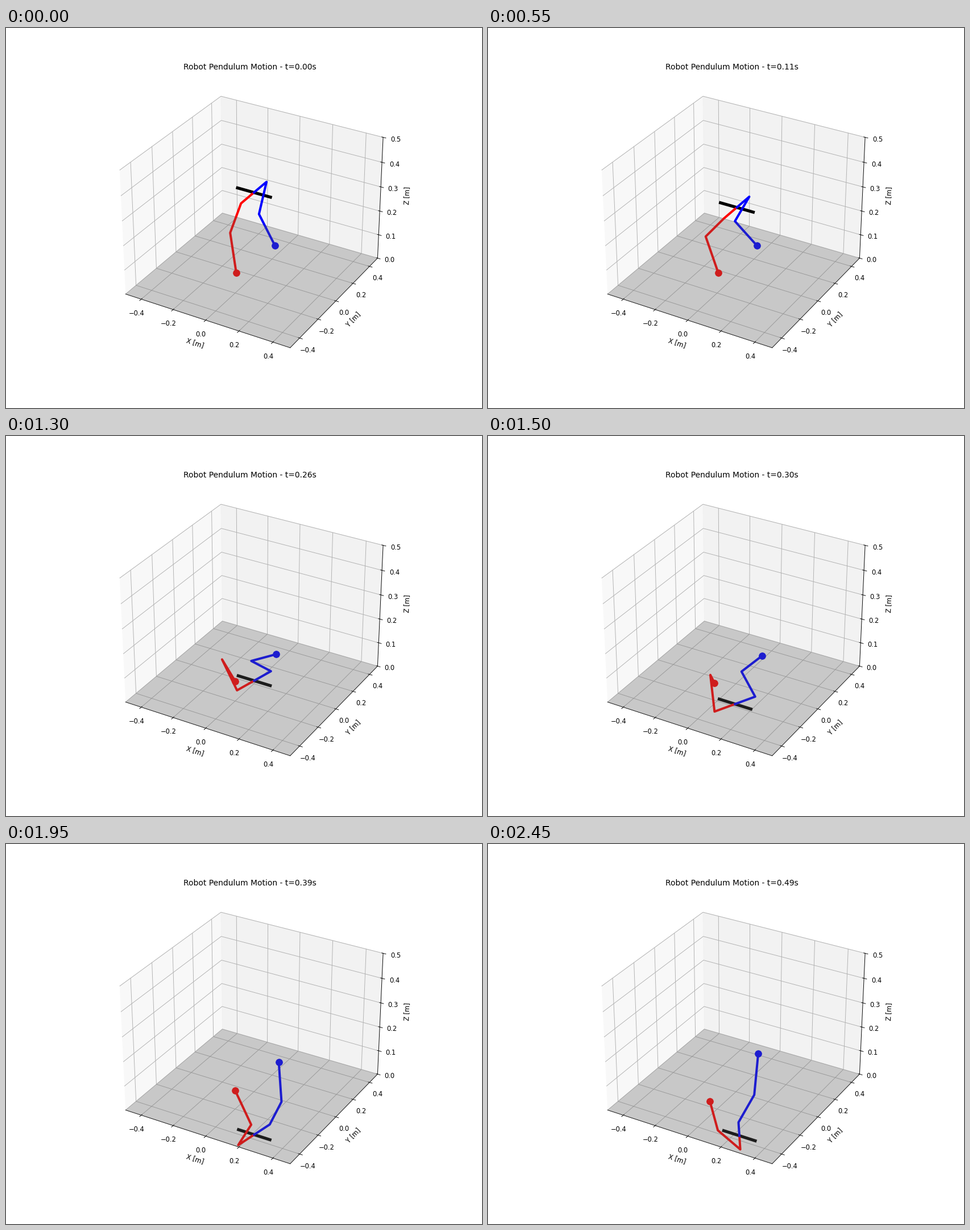
These frames come from a looping animation (837x669 px, 2.5 s). A matplotlib script:

```python
import numpy as np
import matplotlib.pyplot as plt
from matplotlib.animation import FuncAnimation

FRAMES, STEP_MS, DT = 50, 50, 0.01

GRAVITY = 9.81
BRAKE_TIME = 0.26   # the fall stops speeding up here
START_Z, MAX_DROP = 0.345, 0.531
BAR_HALF, HIP_HALF, THIGH = 0.1, 0.134, 0.148


def glide(t, *keys):
    """Smooth curve through (time, value, ...) keys that never overshoots."""
    keys = np.array(keys, float)
    k, v = keys[:, 0], keys[:, 1:]
    h = np.diff(k)[:, None]
    d = np.diff(v, axis=0) / h
    m = np.zeros_like(v)
    product = d[:-1] * d[1:]
    rising = product > 0
    m[1:-1][rising] = 2 * product[rising] / (d[:-1] + d[1:])[rising]

    t = np.clip(t, k[0], k[-1])
    i = min(np.searchsorted(k, t, side="right") - 1, len(h) - 1)
    s = (t - k[i]) / h[i]
    return ((1 + 2 * s) * (1 - s) ** 2 * v[i] + s * (1 - s) ** 2 * h[i] * m[i]
            + s * s * (3 - 2 * s) * v[i + 1]
            + s * s * (s - 1) * h[i] * m[i + 1])


def body_at(t):
    """Free fall, steady speed, then a hard stop with a soft dip."""
    u = min(t, BRAKE_TIME)
    drop = min(GRAVITY * u * (t - u / 2), MAX_DROP)
    drop += 0.016 * np.sin(np.pi * np.clip((t - 0.39) / 0.1, 0, 1))
    x = glide(t, (0, 0), (0.2, 0.009), (0.33, -0.008), (0.49, 0.022))[0]
    return np.array([x, 0, START_Z - drop])


def yaw_at(t):
    return np.radians(glide(t, (0.2, 0), (0.33, 30), (0.49, -32))[0])


def red_pose(t):
    """Thigh angle and foot position."""
    angle = glide(t, (0, -27), (0.2, -87), (0.3, -165), (0.39, -219),
                  (0.49, -125))
    slide = glide(t, (0.24, 0, 0), (0.3, -0.005, -0.03),
                  (0.39, 0.004, -0.018), (0.49, 0.026, -0.13))
    return angle[0], np.array([-0.031, -0.135, 0.055]) + [*slide, 0]


def blue_pose(t):
    angle = glide(t, (0, -18), (0.2, -66), (0.3, -115), (0.39, -214),
                  (0.49, -216))
    slide = glide(t, (0.24, 0, 0), (0.3, 0.035, -0.005),
                  (0.39, 0.021, 0.005), (0.49, -0.037, 0.08))
    return angle[0], np.array([0.054, 0.135, 0.091]) + [*slide, 0]


def leg_path(body, yaw, side, angle, foot):
    """Body, hip, knee and foot; the thigh swings in the turned body's plane."""
    a = np.radians(angle)
    hip = body + side * HIP_HALF * np.array([np.sin(yaw), np.cos(yaw), 0])
    knee = hip + THIGH * np.array(
        [np.sin(a) * np.cos(yaw), -np.sin(a) * np.sin(yaw), -np.cos(a)])
    return np.array([body, hip, knee, foot])


fig = plt.figure(figsize=(10.0845, 8.0605), dpi=83)
ax = fig.add_subplot(111, projection="3d")

# Translucent ground, tinting whatever lies behind it
gx, gy = np.meshgrid([-0.5, 0.5], [-0.5, 0.5])
ax.plot_surface(gx, gy, np.zeros_like(gx), color="gray", alpha=0.3)

bar, = ax.plot([], [], [], color="black", lw=4.6)
legs = []
for color, side, pose in (("red", -1, red_pose), ("blue", 1, blue_pose)):
    line, = ax.plot([], [], [], color=color, lw=3.5)
    foot, = ax.plot([], [], [], color=color, marker="o", ms=10, ls="none")
    legs.append((line, foot, side, pose))

ax.set(xlim=(-0.5, 0.5), ylim=(-0.5, 0.5), zlim=(0, 0.5),
       xlabel="X [m]", ylabel="Y [m]", zlabel="Z [m]")
ax.set_xticks(np.linspace(-0.4, 0.4, 5))
ax.set_yticks(np.linspace(-0.4, 0.4, 5))
ax.set_zticks(np.linspace(0, 0.5, 6))


def update(i):
    t = i * DT
    body, yaw = body_at(t), yaw_at(t)
    x, y, z = body
    bar.set_data_3d([x - BAR_HALF, x + BAR_HALF], [y, y], [z, z])
    for line, foot, side, pose in legs:
        path = leg_path(body, yaw, side, *pose(t))
        line.set_data_3d(*path.T)
        foot.set_data_3d(*path[-1:].T)
    ax.set_title(f"Robot Pendulum Motion - t={t:.2f}s")
    return []


anim = FuncAnimation(fig, update, frames=FRAMES, interval=STEP_MS,
                     repeat=True, repeat_delay=0, blit=False)
plt.show()
```
